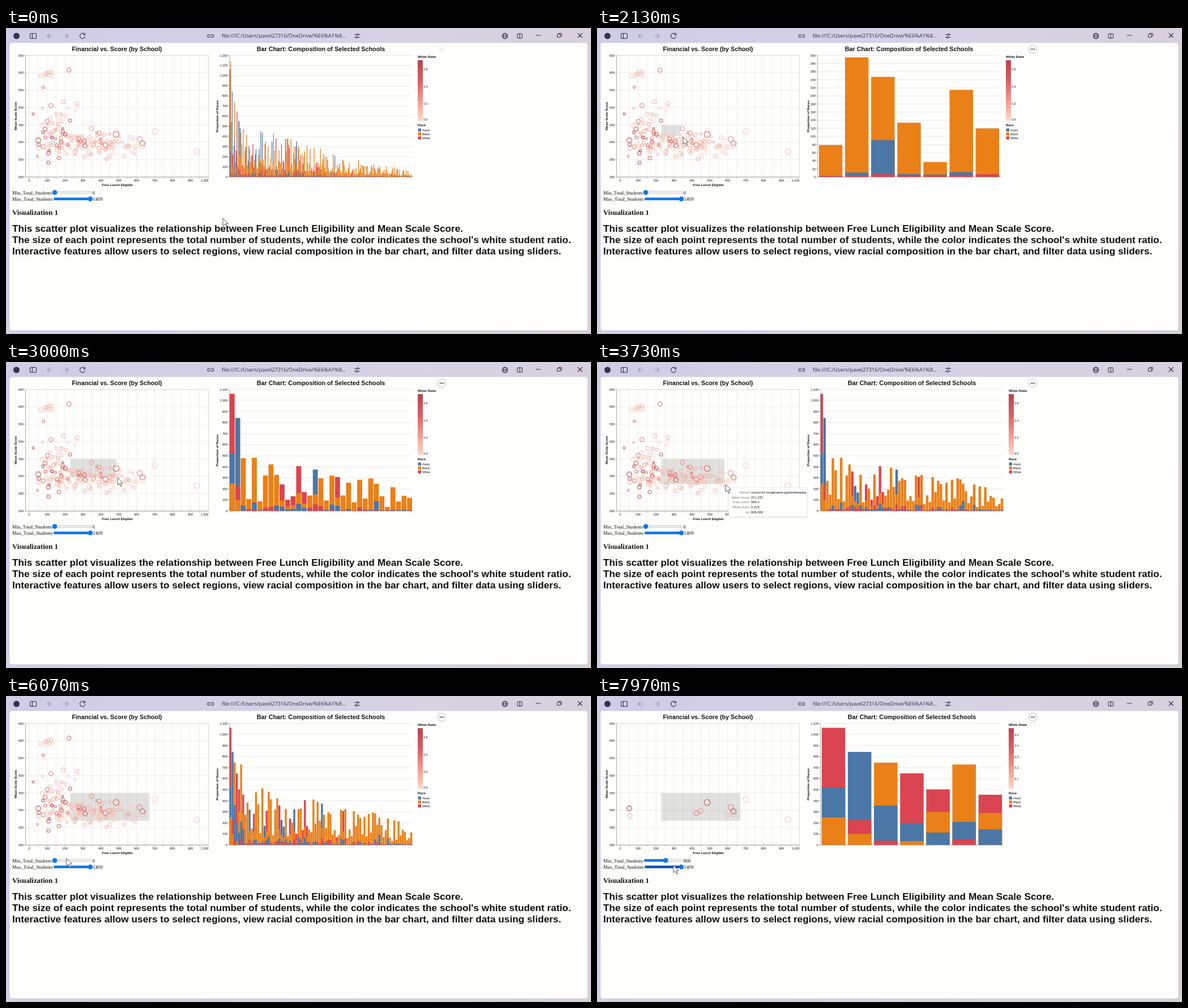
Recreate the animation shown at these times as an HTML page. Size 1033 by 542 pixels, loop 8000 ms.

```html
<!DOCTYPE html>
<html lang="en">
<head>
<meta charset="utf-8">
<title>Scatter and bar dashboard</title>
<style>
  html, body { margin: 0; width: 100%; height: 100%; overflow: hidden; }
  body { background: linear-gradient(115deg, #cfcce6, #d7d3e4 55%, #d6cfd6); }
  svg { display: block; width: 100%; height: 100%; }
  text { font-family: "Liberation Sans", Arial, sans-serif; font-size: 5.4px; fill: #111; white-space: pre; }
  .title { font-size: 10.75px; font-weight: bold; text-anchor: middle; }
  .label { font-size: 5.9px; font-weight: bold; }
  .tip { font-size: 5.9px; }
  .serif { font-family: "Liberation Serif", "Times New Roman", serif; font-size: 8.6px; }
  .head { font-size: 12.8px; font-weight: bold; }
  .big { font-size: 17.23px; font-weight: bold; }
  .url { font-family: "Open Sans", sans-serif; font-size: 9.25px; fill: #2d2945; }
  .end { text-anchor: end; }
  .mid { text-anchor: middle; }
  .icon { fill: none; stroke: #37324f; stroke-width: 1.1; stroke-linecap: round; stroke-linejoin: round; }
  .dim { stroke: #9b97b3; }
</style>
</head>
<body>
<svg id="stage" viewBox="0 0 1033 542">
  <defs>
    <linearGradient id="reds" x1="0" y1="0" x2="0" y2="1">
      <stop offset="0" stop-color="#b4464f"/><stop offset=".35" stop-color="#dc5f66"/>
      <stop offset=".7" stop-color="#f3a195"/><stop offset="1" stop-color="#fcd8cb"/>
    </linearGradient>
  </defs>
  <circle cx="18.5" cy="14" r="5.5" fill="#37324f"/>
  <g class="icon">
    <rect x="42.5" y="9.5" width="11" height="9" rx="2"/><path d="M46.5 9.5v9"/>
    <path class="dim" d="M82 14h-9m4-4-4 4 4 4M101 14h9m-4-4 4 4-4 4"/>
    <path d="M139 11.5a4.6 4.6 0 1 0 .6 3.5M139.5 9v3h-3"/>
    <path d="M360 11.5h-1.5a2.5 2.5 0 0 0 0 5h1.5M362.5 11.5h1.5a2.5 2.5 0 0 1 0 5h-1.5M359.5 14h3.5"/>
    <path d="M615.5 11.5h4m3 0h2M615.5 16.5h2m3 0h4"/><circle cx="621" cy="11.5" r="1.5"/><circle cx="619" cy="16.5" r="1.5"/>
    <circle cx="881" cy="14" r="4.8"/><ellipse cx="881" cy="14" rx="2.2" ry="4.8"/><path d="M876.5 14h9"/>
    <rect x="903" y="10" width="8.5" height="8" rx="1.5"/><path d="M907.2 10v8"/>
    <path d="M936 13h8M1010 9.5l7.5 7.5m0-7.5-7.5 7.5"/>
    <rect x="973.5" y="11" width="5.5" height="5.5" rx="1"/><path d="M975.5 9.5h4.5q1 0 1 1v4.5"/>
  </g>
  <text class="url" x="381" y="17">file:///C:/Users/pavel27316/OneDrive/%E6%A1%8...</text>
  <rect x="6.5" y="26.5" width="1020" height="509" rx="4" fill="#fefefd"/>
  <g id="axes"></g>
  <rect id="brush" x="113.5" y="172" fill="#333" fill-opacity=".14"/>
  <g id="points" fill="none" stroke-opacity=".8" stroke-width="1.1"></g>
  <g id="bars"></g>
  <g id="sliders"></g>
  <g id="menu">
    <circle cx="769.5" cy="37.5" r="7.3" fill="#fff" stroke="#aaa" stroke-width=".8"/>
    <path d="M766.7 37.5h0m2.8 0h0m2.8 0h0" stroke="#222" stroke-width="2" stroke-linecap="round"/>
  </g>
  <text class="serif head" x="11" y="331">Visualization 1</text>
  <text class="big" x="11" y="361">This scatter plot visualizes the relationship between Free Lunch Eligibility and Mean Scale Score.</text>
  <text class="big" x="11" y="381">The size of each point represents the total number of students, while the color indicates the school's white student ratio.</text>
  <text class="big" x="11" y="401">Interactive features allow users to select regions, view racial composition in the bar chart, and filter data using sliders.</text>
  <g id="tooltip"></g>
  <path id="cursor" d="M0 0v13l3.2-2.8 2.3 5.3 2.2-1-2.3-5.1h4z" fill="#fff" stroke="#4a4a55" stroke-width=".9" stroke-linejoin="round"/>
</svg>
<script>
const LOOP = 8000;
const COLORS = { A: '#4b77a7', B: '#ea8017', W: '#da4450' };
const RACES = { A: 'Asian', B: 'Black', W: 'White' };
const TOP = 48.5, BASE = 264, WIDTH = 323;

// Cursor: time, x, y
const PATH = [
  [0, 383, 337], [250, 383, 337], [1500, 113.5, 172], [1700, 113.5, 172],
  [2130, 152, 193], [3000, 197, 205], [3730, 227, 217], [4250, 253, 221], [5150, 253, 221],
  [6070, 107, 288], [6450, 86.5, 289], [6750, 86.5, 289], [7650, 121.7, 290], [7970, 135, 300]
];
// Brushed schools: time, count
const BRUSHED = [[1750, 0], [2130, 7], [3000, 33], [3730, 66], [4300, 86]];
const DRAG = [[6750, 0], [7700, 800]];

// Segment tops, tallest first, of the largest schools and of those brushed first
const LEADERS = ['W1060A520B250', 'A842W225B100', 'B745A357W40', 'W648A200B35', 'W503B300A113', 'B728A210W55', 'W455B290A142'];
const CENTRE = ['B79W3', 'B295A11W4', 'B247A91W7', 'B134A7W3', 'B37A6W3', 'B215A12W5', 'B120W7'];

// Landmark points: x, y, radius, white ratio
const LANDMARKS = [
  [57, 199, 4.4, .6], [58, 212.5, 4.1, .15], [194.5, 188.5, 5.3, .45], [236, 197, 4.5, .38],
  [241, 204.5, 4.5, .55], [183, 203.5, 4.3, .25], [175.5, 207.5, 4.2, .38], [229, 211, 4.2, .1],
  [240.5, 210, 4.2, .12], [263, 183, 5, .08], [337, 219, 5, .1],
  [111, 74.5, 3.7, .45], [79.5, 137.5, 3.8, .42], [66, 105, 2.2, .45], [48, 152, 2, .55],
  [69, 179, 3.5, .5], [151, 178, 3.8, .3], [139.5, 208.5, 3.8, .55], [75, 238.5, 3, .5]
];

const $ = id => document.getElementById(id);
const text = (x, y, s, cls = '', more = '') => `<text x="${x}" y="${y}" class="${cls}" ${more}>${s}</text>`;
const rect = (x, y, w, h, fill, more = '') => `<rect x="${x}" y="${y}" width="${w}" height="${h}" fill="${fill}" ${more}/>`;
const line = (x1, y1, x2, y2, color) => `<path d="M${x1} ${y1}L${x2} ${y2}" stroke="${color}" stroke-width=".6"/>`;
const range = (n, fn) => Array.from({ length: n }, (_, i) => fn(i));
const mix = (a, b, k) => a + (b - a) * k;
const clamp = (v, lo, hi) => Math.min(hi, Math.max(lo, v));
const upright = (x, y, s) => text(0, 0, s, 'label mid', `transform="translate(${x} ${y}) rotate(-90)"`);

// Linear interpolation through [key, ...values] steps
function follow(steps, t) {
  const last = steps[steps.length - 1];
  const i = steps.findIndex(s => s[0] > t);
  if (i === 0) return steps[0].slice(1);
  if (i < 0) return last.slice(1);
  const [a, b] = [steps[i - 1], steps[i]], k = (t - a[0]) / (b[0] - a[0]);
  return a.slice(1).map((v, j) => mix(v, b[j + 1], k));
}

function seeded(seed) {
  return () => (seed = (seed * 16807) % 2147483647) / 2147483647;
}
const random = seeded(4711);
const bell = () => random() + random() + random() - 1.5;

function cloud(n, x0, x1, y, spread, paleness, strength) {
  return range(n, () => [
    mix(x0, x1, random()), y + spread * bell() * 1.6, mix(1.7, 3.6, random()), mix(paleness, strength, random())
  ]);
}
const points = [
  ...cloud(8, 60, 92, 82, 3, .03, .15), ...cloud(5, 85, 135, 128, 12, .03, .15),
  ...cloud(22, 62, 108, 172, 16, .03, .2), ...cloud(90, 70, 195, 207, 13, .02, .2),
  ...cloud(30, 150, 232, 212, 13, .03, .15), ...cloud(20, 48, 118, 200, 18, .35, .6),
  ...cloud(8, 110, 180, 198, 9, .3, .45), ...LANDMARKS
];

function redTone(k) {
  const stops = [[252, 216, 205], [233, 108, 96], [160, 26, 42]];
  const p = clamp(k, 0, 1) * 2, i = Math.min(1, Math.floor(p));
  return `rgb(${stops[i].map((c, j) => Math.round(mix(c, stops[i + 1][j], p - i)))})`;
}

// Races an entry leaves out become smaller segments.
function parseTops(entry) {
  const tops = [...entry.matchAll(/([ABW])(\d+)/g)].map(m => [m[1], +m[2]]);
  for (const race of random() < .5 ? 'BAW' : 'BWA') {
    if (tops.some(t => t[0] === race)) continue;
    const share = tops[0][0] === 'B' ? mix(.04, .25, random() ** 2) : .4;
    tops.push([race, tops[tops.length - 1][1] * share]);
  }
  return tops;
}

// u runs from the largest school (0) to the smallest (1).
function randomSchool(u, limit, skew) {
  const dice = random();
  const race = dice < .2 * (1 - u) ? 'A' : dice < .42 * (1.05 - u) ? 'W' : 'B';
  return parseTops(race + Math.round(limit * mix(.16, 1, random() ** skew)));
}

const schools = range(86, i => {
  const slot = (i - 64) / 3;
  const central = slot >= 0 && slot < 7 && slot % 1 === 0;
  const entry = LEADERS[i] || (central && CENTRE[slot]);
  return {
    tops: entry ? parseTops(entry) : randomSchool(i / 86, 610 - 4.6 * i, 1.3),
    students: 1400 / (1 + i / 8.7),
    order: central ? 0 : i < 2 ? .1 : i < 7 ? 2 : .2 + random()
  };
});
[...schools].sort((a, b) => a.order - b.order).forEach((s, i) => { s.rank = i; });

const everySchool = range(230, i => {
  const u = i / 230;
  const tops = i === 1 ? parseTops('B1145A250')
    : i < 12 && i % 3 === 0 ? parseTops(LEADERS[i / 3])
    : randomSchool(u, 70 + 520 * (1 - u) ** 1.3 + 250 * Math.exp(-u * 35), 1.9);
  return { tops };
});

function drawAxes() {
  const sx = v => 41 + v * .3163, sy = v => BASE - (v - 300) * .6157;
  let out = '';
  for (let v = 0; v <= 1000; v += 50) {
    out += line(sx(v), TOP, sx(v), BASE, '#dfdfdb') + line(sx(v), BASE, sx(v), BASE + 3, '#888');
    if (v % 100 === 0) {
      out += v < 1000 ? text(sx(v), 272, v, 'mid') : text(357.5, 272, '1,000', 'end');
    }
  }
  for (let v = 300; v <= 650; v += 50) {
    out += line(34.5, sy(v), 357.5, sy(v), '#dfdfdb') + line(31.5, sy(v), 34.5, sy(v), '#888')
      + text(31, sy(v) + 2, v, 'end');
  }
  $('axes').innerHTML = out + `<path d="M34.5 ${TOP}V${BASE}H357.5V${TOP}Z" fill="none" stroke="#ccc" stroke-width=".6"/>`
    + line(34.5, BASE, 357.5, BASE, '#888') + line(34.5, TOP, 34.5, BASE, '#888')
    + text(196, 41.3, 'Financial vs. Score (by School)', 'title')
    + text(196.5, 280, 'Free Lunch Eligible', 'label mid')
    + upright(18.5, 156, 'Mean Scale Score') + upright(374.5, 156.5, 'Proportion of Races');
}

function niceStep(max) {
  const raw = max / 10, power = 10 ** Math.floor(Math.log10(raw)), k = raw / power;
  return power * (k >= Math.sqrt(50) ? 10 : k >= Math.sqrt(10) ? 5 : k >= Math.SQRT2 ? 2 : 1);
}

function drawLegend(x, narrow) {
  const ticks = narrow ? [.1, .2, .3, .4, .5] : [0, .2, .4, .6];
  const y = v => narrow ? 166 - v * 194 : v ? 164.5 - v * 152 : 161.5;
  return text(x, 53, 'White Ratio', 'label') + rect(x, 57, 9, 107.5, 'url(#reds)')
    + ticks.map(v => text(x + 10, y(v) + 2, v.toFixed(1))).join('')
    + text(x, 174, 'Race', 'label')
    + Object.keys(RACES).map((r, i) =>
      rect(x + .5, 178 + 7 * i, 5.5, 5.5, COLORS[r]) + text(x + 8, 182.7 + 7 * i, RACES[r])).join('');
}

function drawBars(list, narrow) {
  const peak = Math.max(10, ...list.map(s => s.tops[0][1]));
  const step = niceStep(peak), max = Math.ceil(peak / step) * step;
  const left = max >= 1000 ? 394.5 : 389.5;
  const height = v => v / max * (BASE - TOP);
  let out = text(left + 161.5, 41.3, 'Bar Chart: Composition of Selected Schools', 'title');
  for (let v = 0; v <= max; v += step) {
    const y = BASE - height(v);
    out += line(left, y, left + WIDTH, y, '#d9d9e0') + line(left - 3, y, left, y, '#888')
      + text(left - 3.5, y + 2, v.toLocaleString('en-US'), 'end');
  }
  const band = WIDTH / Math.max(1, list.length);
  list.forEach((s, i) => s.tops.forEach(([race, top]) => {
    const h = height(top);
    out += rect((left + band * (i + .05)).toFixed(2), (BASE - h).toFixed(2), (band * .9).toFixed(2), h.toFixed(2), COLORS[race]);
  }));
  $('bars').innerHTML = out + line(left, TOP, left, BASE, '#888') + line(left, BASE, left + WIDTH, BASE, '#888')
    + drawLegend(left + 332.5, narrow);
}

function drawPoints(min, narrow) {
  $('points').innerHTML = points.filter(p => (p[2] / .14) ** 2 >= min).map(([x, y, r, ratio]) =>
    `<circle cx="${x}" cy="${y}" r="${r}" stroke="${redTone(ratio / (narrow ? .58 : .66))}"/>`).join('');
}

function slider(x, y, value, name, hover) {
  const blue = hover ? '#0b56b0' : '#0d78e8', knob = x + 3 + value / 1409 * 62;
  return text(11, y + 3.6, name, 'serif')
    + rect(x, y - 2, 68, 4, '#efefef', 'rx="2" stroke="#b5b5b5" stroke-width=".6"')
    + (value ? rect(x, y - 2.2, knob - x, 4.4, blue, 'rx="2"') : '')
    + `<circle cx="${knob}" cy="${y}" r="4.3" fill="#0d78e8"/>`
    + text(x + 69.5, y + 3.6, value, 'serif');
}

function drawSliders(min, hover) {
  $('sliders').innerHTML = slider(83, 291.2, min, 'Min_Total_Students', false)
    + slider(84, 302.8, 1409, 'Max_Total_Students', hover);
}

function drawTooltip() {
  const rows = [['School', 'school for imaginative gardenkeeping'], ['Mean Score', '371.237'],
    ['Free Lunch', '583.0'], ['White Ratio', '0.015'], ['tot', '606.000']];
  $('tooltip').innerHTML = rect(233.5, 224, 139, 52, '#000', 'rx="2" opacity=".08"')
    + rect(232.5, 222.5, 139, 52, '#fefefd', 'rx="1.5" stroke="#ddd" stroke-width=".6"')
    + rows.map(([key, value], i) => text(269.5, 233 + 8.7 * i, key, 'tip end', 'style="fill:#777"')
      + text(272, 233 + 8.7 * i, value, 'tip')).join('');
}

const memo = {};
function update(name, key, draw) {
  if (memo[name] !== key) { memo[name] = key; draw(); }
}

function render(t) {
  const [x, y] = follow(PATH, t);
  $('cursor').setAttribute('transform', `translate(${x} ${y})`);
  $('menu').setAttribute('opacity', clamp((t - 400) / 400, .18, 1));

  // The brush corner trails the cursor slightly.
  const brushing = t >= BRUSHED[0][0];
  const [bx, by] = follow(PATH, clamp(t - 50, 1700, 4300));
  $('brush').setAttribute('width', brushing ? Math.max(0, bx - 113.5) : 0);
  $('brush').setAttribute('height', brushing ? Math.max(0, by - 172) : 0);
  $('tooltip').setAttribute('visibility', t >= 3650 && t < 3820 ? 'visible' : 'hidden');

  const min = Math.round(follow(DRAG, t)[0] / 10) * 10;
  const count = Math.floor(follow(BRUSHED, t)[0] + 1e-6);
  const narrow = min > 600, hover = t > 7850;
  const shown = brushing ? schools.filter(s => s.rank < count && s.students >= min) : everySchool;
  update('bars', [shown.length, narrow, brushing].join(), () => drawBars(shown, narrow));
  update('points', [min, narrow].join(), () => drawPoints(min, narrow));
  update('sliders', [min, hover].join(), () => drawSliders(min, hover));
}

drawAxes();
drawTooltip();
const start = performance.now();
function tick() {
  render((performance.now() - start) % LOOP);
  requestAnimationFrame(tick);
}
tick();
</script>
</body>
</html>
```
